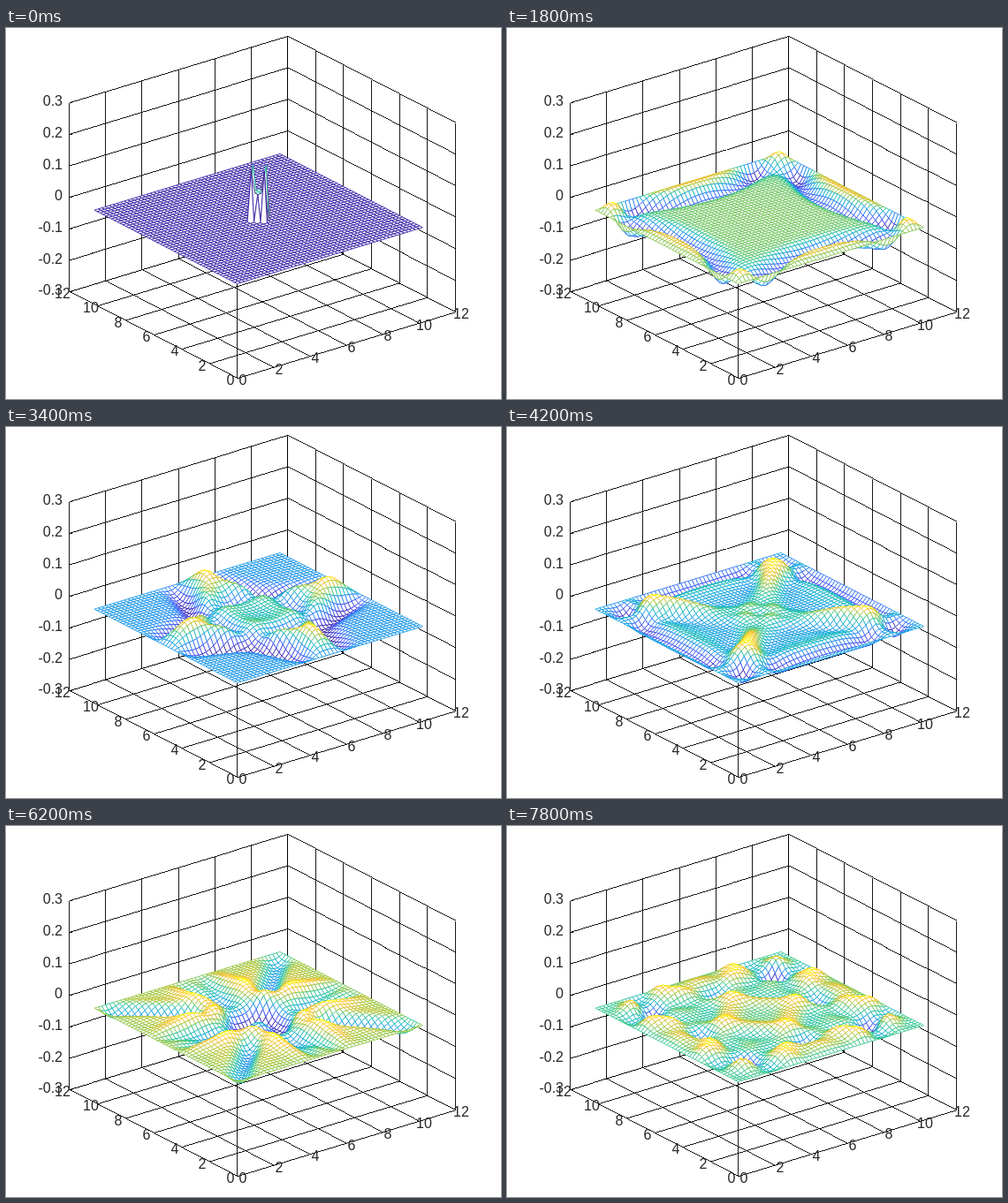
Animation of 560x420 px, one loop 8 s. Source, as an HTML page:

```html
<!DOCTYPE html>
<html lang="en">
<head>
<meta charset="utf-8">
<title>Wave on a square membrane</title>
<style>
  html, body { margin: 0; width: 100%; height: 100%; overflow: hidden; background: #fff; }
  svg { display: block; }
  text { font: 16px "Liberation Sans", Arial, sans-serif; fill: #262626; }
  #grid, #mesh { stroke-width: .9; shape-rendering: crispEdges; }
  #grid { stroke: #000; fill: none; }
  #mesh { fill: #fff; stroke-linejoin: bevel; }
</style>
</head>
<body>
<svg width="560" height="420" viewBox="0 0 560 420">
  <path id="grid"/>
  <g id="labels"></g>
  <g id="mesh"></g>
</svg>
<script>
const FRAMES = 40, FRAME_MS = 200;
const N = 51, MID = (N - 1) / 2, SIZE = 10.2, CELL = SIZE / (N - 1);
const SPEED = 0.7, WIDTH = 0.44, HEIGHT = 0.28, MODES = 16;
const PARULA = [[62, 38, 168], [72, 82, 244], [46, 135, 247], [18, 177, 214],
                [55, 200, 151], [171, 199, 57], [254, 195, 56], [249, 251, 21]];
const byId = id => document.getElementById(id);
const range = n => Array.from({ length: n }, (_, i) => i);

// Axes run 0..12, 0..12 and -0.3..0.3.
const project = (x, y, z) => [
  261.5 + (x * 247 - y * 190) / 12,
  396.5 - (x * 75 + y * 98) / 12 - (z + 0.3) / 0.6 * 214
];

function drawAxes() {
  const lines = [], labels = [];
  const line = (...points) =>
    lines.push('M' + points.map(p => project(...p).join()).join('L'));
  const label = (text, point, dx, dy, anchor) => {
    const [x, y] = project(...point);
    labels.push(`<text x="${Math.round(x + dx)}" y="${Math.round(y + dy)}" text-anchor="${anchor}">${text}</text>`);
  };
  for (let v = 0; v <= 12; v += 2) {
    line([v, 0, -0.3], [v, 12, -0.3], [v, 12, 0.3]);
    line([0, v, -0.3], [12, v, -0.3], [12, v, 0.3]);
    label(v, [v, 0, -0.3], 6, 7.5, 'middle');
    label(v, [0, v, -0.3], -7.5, 7.5, 'middle');
  }
  for (let k = -3; k <= 3; k++) {
    const z = k / 10;
    line([0, 12, z], [12, 12, z], [12, 0, z]);
    const [x, y] = project(0, 12, z);
    lines.push(`M${x} ${y}h3`);
    label(z, [0, 12, z], -7.5, 3.9, 'end');
  }
  line([0, 0, -0.3], [0, 0, 0]);
  byId('grid').setAttribute('d', lines.join(''));
  byId('labels').innerHTML = labels.join('');
}

// Standing waves of the clamped square; a centred bump excites only the odd ones.
const modes = range(MODES).map(m => {
  const k = (2 * m + 1) * Math.PI / SIZE;
  return {
    k,
    weight: (m % 2 ? -2 : 2) / SIZE * WIDTH * Math.sqrt(2 * Math.PI) * Math.exp(-((k * WIDTH) ** 2) / 2),
    shape: range(N).map(i => Math.sin(k * i * CELL))
  };
});
const sum = (items, value) => items.reduce((total, item, i) => total + value(item, i), 0);

function waveField(distance) {
  const partial = modes.map(a => {
    const factors = modes.map(b => {
      const k = Math.hypot(a.k, b.k);
      return HEIGHT * a.weight * b.weight * (1 + (k * WIDTH) ** 2 / 8) * Math.cos(k * distance);
    });
    return range(N).map(j => sum(modes, (b, n) => factors[n] * b.shape[j]));
  });
  return range(N).map(i => range(N).map(j => sum(modes, (a, m) => a.shape[i] * partial[m][j])));
}

// The starting splash: a small diamond with four raised tips.
function splashField() {
  return range(N).map(row => range(N).map(col => {
    const i = Math.abs(row - MID), j = Math.abs(col - MID);
    if (i + j > 2) return 0;
    return Math.max(i, j) === 2 ? 0.16 : 0.085;
  }));
}

function parula(t) {
  const k = Math.min(6, Math.floor(t * 7)), f = t * 7 - k;
  return `rgb(${PARULA[k].map((a, c) => Math.round(a + (PARULA[k + 1][c] - a) * f))})`;
}

function drawMesh(field) {
  const flat = field.flat(), low = Math.min(...flat), span = Math.max(...flat) - low;
  const points = field.map((row, i) => row.map((z, j) =>
    project(i * CELL, j * CELL, z).map(v => v.toFixed(2)).join()));
  let out = '';
  // Far cells first, so that nearer ones hide them.
  for (let i = N - 2; i >= 0; i--) {
    for (let j = N - 2; j >= 0; j--) {
      const corners = [points[i][j], points[i + 1][j], points[i + 1][j + 1], points[i][j + 1]];
      out += `<polygon points="${corners.join(' ')}" stroke="${parula((field[i][j] - low) / span)}"/>`;
    }
  }
  byId('mesh').innerHTML = out;
}

drawAxes();
const start = performance.now();
let shown = -1;

function tick() {
  const frame = Math.floor((performance.now() - start) / FRAME_MS) % FRAMES;
  if (frame !== shown) {
    shown = frame;
    drawMesh(frame ? waveField(frame * SPEED) : splashField());
  }
  requestAnimationFrame(tick);
}
tick();
</script>
</body>
</html>
```
